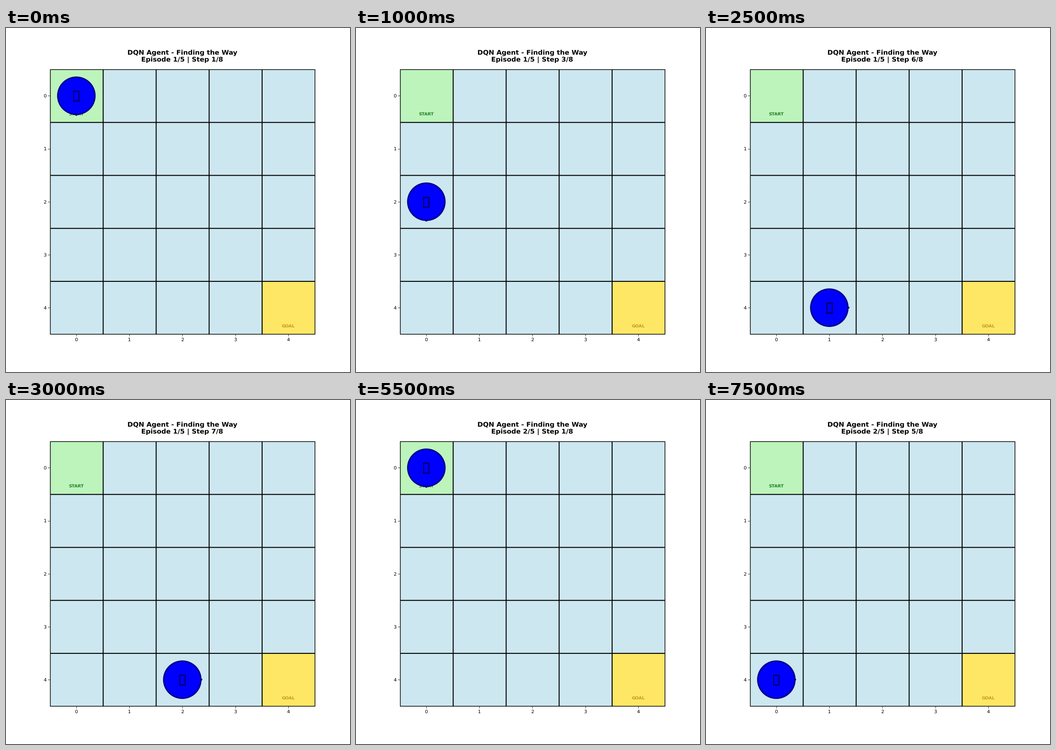
Recreate the animation shown at these times as a matplotlib script. Size 748 by 748 pixels, loop 8 s.

```python
import matplotlib.pyplot as plt
from matplotlib.animation import FuncAnimation
from matplotlib.patches import Circle, Rectangle

plt.rcParams.update({"font.family": "DejaVu Sans", "text.hinting": "none"})

SIZE = 5
EPISODES = 5
HOLD = 3  # ticks spent at the end of an episode
FRAMES = 16
INTERVAL = 500

# Cells visited as (column, row): down the left side, then along the bottom.
PATH = [(0, row) for row in range(SIZE)] + [(col, SIZE - 1) for col in range(1, SIZE - 1)]
STEPS = len(PATH)
ROBOT = "\U0001F916"
PARTY = "\U0001F389"

# Cell edges sit a fraction of a pixel right of and below the tick grid.
EDGE_X, EDGE_Y = 0.0065, 0.0033

fig, ax = plt.subplots(figsize=(10, 10), dpi=74.8)
ax.set_xlim(-0.5, SIZE - 0.5)
ax.set_ylim(SIZE - 0.5, -0.5)
ax.set_aspect("equal")
ax.set_xticks(range(SIZE))
ax.set_yticks(range(SIZE))
ax.spines[:].set_visible(False)
title = ax.set_title("", fontsize=14, fontweight="bold", pad=15)


def draw_cell(col, row):
    color = {(0, 0): "lightgreen", (SIZE - 1, SIZE - 1): "gold"}.get((col, row), "lightblue")
    ax.add_patch(Rectangle((col - 0.5 + EDGE_X, row - 0.5 + EDGE_Y), 1, 1, snap=False,
                           facecolor=(color, 0.6), linewidth=0, clip_on=False))


def draw_grid():
    style = dict(color="black", snap=False, clip_on=False, solid_capstyle="butt")
    ends = [-0.49, SIZE - 0.495]
    for i in range(1, SIZE):
        ax.plot([i - 0.5 + EDGE_X] * 2, ends, linewidth=2, **style)
        ax.plot(ends, [i - 0.5 + EDGE_Y] * 2, linewidth=2, **style)
    ax.add_patch(Rectangle((-0.491, -0.494), SIZE - 0.005, SIZE - 0.005, fill=False,
                           linewidth=1.4, snap=False, clip_on=False, zorder=3))


def draw_label(cell, text, color):
    ax.text(cell, cell + 0.35, text, color=color, alpha=0.8, fontsize=9,
            fontweight="bold", ha="center", va="center")


for row in range(SIZE):
    for col in range(SIZE):
        draw_cell(col, row)
draw_grid()
draw_label(0, "START", "darkgreen")
draw_label(SIZE - 1, "GOAL", "darkgoldenrod")
ax.set_xlim(-0.5, SIZE - 0.5)
ax.set_ylim(SIZE - 0.5, -0.5)

pointer, = ax.plot([], [], color="darkblue", linewidth=4, solid_capstyle="round", zorder=9)
body = ax.add_patch(Circle((0, 0), 0.35, facecolor="blue", edgecolor="darkblue",
                           linewidth=3, zorder=10))
face = ax.text(0, 0, ROBOT, fontsize=25, ha="center", va="center", zorder=11)


def update(frame):
    episode, tick = divmod(frame, STEPS + HOLD)
    step = min(tick, STEPS - 1)
    x, y = PATH[step]

    body.center = (x, y)
    face.set_position((x, y))
    dx, dy = (0, 1) if y < SIZE - 1 else (1, 0)
    pointer.set_data([x, x + 0.36 * dx], [y, y + 0.36 * dy])
    pointer.set_visible(tick < STEPS)

    heading = f"DQN Agent - Finding the Way\nEpisode {episode + 1}/{EPISODES} | Step {step + 1}/{STEPS}"
    if step == STEPS - 1:
        heading += f"\n{PARTY} Goal Reached!"
    title.set_text(heading)
    return pointer, body, face, title


anim = FuncAnimation(fig, update, frames=FRAMES, interval=INTERVAL,
                     repeat=True, repeat_delay=0, blit=False)
plt.show()
```
